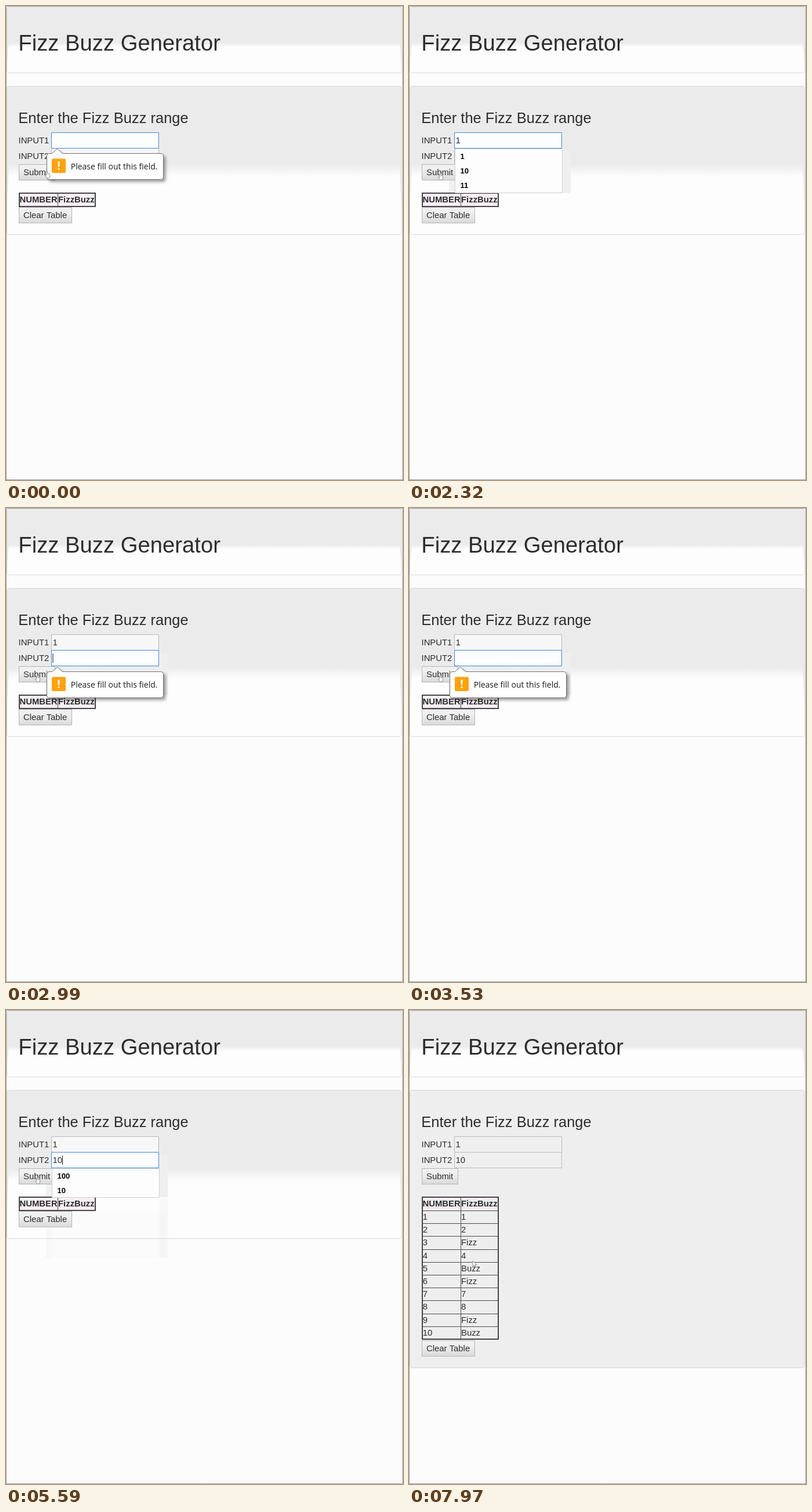
Write an HTML page with a canvas that moves like this. It is 685 by 818 pixels and loops after 8000 ms.

```html
<!DOCTYPE html>
<html lang="en">
<head>
<meta charset="utf-8">
<title>Fizz Buzz Generator</title>
<style>
html, body { margin: 0; width: 100%; height: 100%; overflow: hidden; background: #fcfcfc; }
canvas { display: block; }
</style>
</head>
<body>
<canvas id="stage" width="685" height="818"></canvas>
<script>
const ctx = document.getElementById('stage').getContext('2d');
const LOOP = 8000, TABLE_AT = 6660;
const SANS = '"Liberation Sans", Arial, sans-serif';
const INK = '#2d2d2d';
const hand = new Path2D('M3 8V1.5Q4 .3 5 1.5V5L8.5 6V10L7.5 13H3.5L.5 8Z');
const arrow = new Path2D('M0 0V9L2.5 7L4 10L5.5 9.5L4 6.5H7Z');

// Each track lists [time, value...]; a value holds until the next entry.
const caretTrack = [[0, 0], [120, 1], [670, 0], [1230, 1], [2180, 0], [2720, 1], [3140, 0],
  [3680, 1], [4200, 0], [4730, 1], [6120, 0]];
const focusTrack = [[0, 1], [2600, 0], [2720, 2], [6530, 0]];
const bubbleTrack = [[0, 1], [1630, .45], [1760, 0], [2720, .27], [2870, .7], [2990, 1], [5320, .45], [5450, 0]];
const menuTrack = [[0], [1760, '1', '10', '11'], [2600],
  [5450, '100', '10', '1', '15', '11', '12'], [5590, '100', '10'], [6530]];
const pointerTrack = [[0, hand, 67, 284], [1900, hand, 60, 287], [2020, hand, 52, 289], [2180, hand, 50, 288],
  [2320, hand, 50, 287], [7430, arrow, 72, 302], [7550, arrow, 91, 323], [7700, arrow, 100, 349],
  [7820, arrow, 107, 374], [7970, arrow, 110, 433]];

const at = (track, t) => track.filter(step => step[0] <= t).pop().slice(1);

function text(str, x, y, size = 14.875, color = INK, weight = '', family = SANS) {
  ctx.font = `${weight} ${size}px ${family}`;
  ctx.fillStyle = color;
  ctx.fillText(str, x, y);
}

function box(x, y, w, h, fill, stroke, r = 0) {
  ctx.beginPath();
  ctx.roundRect(x + .5, y + .5, w - 1, h - 1, r);
  ctx.fillStyle = fill;
  ctx.fill();
  ctx.strokeStyle = stroke;
  ctx.lineWidth = 1;
  ctx.stroke();
}

function rect(x, y, w, h, fill) {
  ctx.fillStyle = fill;
  ctx.fillRect(x, y, w, h);
}

function vertical(y0, y1, top, bottom) {
  const g = ctx.createLinearGradient(0, y0, 0, y1);
  g.addColorStop(0, top);
  g.addColorStop(1, bottom);
  return g;
}

// Gray upper half that melts into white, with thin tapering edges below.
function glassPanel(y, h, fadeFrom, fadeTo) {
  box(1, y, 682, h, vertical(fadeFrom, fadeTo, '#ebebeb', '#fdfdfd'), '#dadada', 4);
  const tip = fadeTo + (fadeTo - fadeFrom) * 1.5 + 14;
  ctx.fillStyle = '#ececec';
  for (const [edge, side] of [[2, 1], [682, -1]]) {
    ctx.beginPath();
    ctx.moveTo(edge, fadeFrom);
    ctx.lineTo(edge + 3 * side, fadeFrom);
    ctx.lineTo(edge + 2 * side, fadeTo);
    ctx.lineTo(edge, tip);
    ctx.fill();
  }
}

function button(label, y, w, flat) {
  box(22, y, w, 28, flat ? '#f1f1f1' : vertical(y + 8, y + 27, '#f0f0f0', '#dbdbdb'), flat ? '#a0a0a0' : '#b4b4b4');
  text(label, 30, y + 19);
}

function input(y, value, focused, caret, idle) {
  box(78, y, 186, 28, focused ? '#fbfdff' : idle, focused ? '#4289e0' : '#b9b9b9');
  text(value, 80.5, y + 18.5);
  if (focused && caret) rect(80.5 + value.length * 8.27, y + 6, 1, 16, '#222');
}

function table(rows) {
  const bottom = 346 + rows * 22.2;
  rect(23, 323, 131, 23, rows ? '#f1ecf0' : '#f6f0f5');
  text('NUMBER', 23.5, 339, 14.875, INK, 'bold');
  text('FizzBuzz', 90, 339, 14.875, INK, 'bold');
  for (let n = 1; n <= rows; n++) {
    const y = 346 + (n - 1) * 22.2;
    const word = (n % 3 ? '' : 'Fizz') + (n % 5 ? '' : 'Buzz') || n;
    rect(23, Math.round(y), 131, 1, '#4a4a4a');
    text(n, 23.7, y + 16);
    text(word, 90, y + 16);
  }
  rect(89, 323, 1, bottom - 323, '#4a4a4a');
  ctx.strokeStyle = '#484448';
  ctx.lineWidth = 2;
  ctx.strokeRect(23, 323, 131, Math.round(bottom) - 323);
}

function menu(y, items) {
  const h = Math.round(items.length * 25.6);
  box(79, y, 186, h, '#fdfdfd', '#cfcfcf');
  items.forEach((item, i) => text(item, 88.5, y + 17.5 + i * 25.4, 13, '#000', 'bold'));
}

function bubble(y, alpha) {
  const grow = .952 + .048 * alpha;
  ctx.save();
  ctx.globalAlpha = alpha;
  ctx.translate(98, y + 26);
  ctx.scale(grow, grow);
  ctx.translate(-98, -26);
  ctx.beginPath();
  ctx.moveTo(74.5, 8.5);
  ctx.lineTo(79.5, 8.5);
  ctx.lineTo(88.5, .5);
  ctx.lineTo(97.5, 8.5);
  ctx.lineTo(267, 8.5);
  ctx.arcTo(271.5, 8.5, 271.5, 13, 4);
  ctx.arcTo(271.5, 53.5, 267, 53.5, 4);
  ctx.arcTo(70.5, 53.5, 70.5, 49, 4);
  ctx.arcTo(70.5, 8.5, 74.5, 8.5, 4);
  ctx.closePath();
  ctx.shadowColor = 'rgba(0,0,0,.38)';
  ctx.shadowBlur = 5;
  ctx.shadowOffsetX = ctx.shadowOffsetY = 4;
  ctx.fillStyle = '#fff';
  ctx.fill();
  ctx.shadowColor = 'transparent';
  ctx.strokeStyle = '#707070';
  ctx.lineWidth = 1;
  ctx.stroke();
  ctx.beginPath();
  ctx.roundRect(79, 17.5, 24, 24.5, 2);
  ctx.fillStyle = '#ffa20c';
  ctx.fill();
  ctx.beginPath();
  ctx.moveTo(89.2, 22.5);
  ctx.lineTo(92.8, 22.5);
  ctx.lineTo(92, 32);
  ctx.lineTo(90, 32);
  ctx.fillStyle = '#fff';
  ctx.fill();
  rect(89.7, 34, 2.7, 2.7, '#fff');
  text('Please fill out this field.', 111.7, 36.3, 14, '#1c1c1c', '', '"Open Sans", "Noto Sans", sans-serif');
  ctx.restore();
}

function pointer(shape, x, y) {
  ctx.save();
  ctx.translate(x, y);
  ctx.fillStyle = '#fafafa';
  ctx.strokeStyle = '#8a8a8a';
  ctx.lineWidth = .9;
  ctx.fill(shape);
  ctx.stroke(shape);
  ctx.restore();
}

function draw(t) {
  const done = t >= TABLE_AT;
  const [focus] = at(focusTrack, t), [caret] = at(caretTrack, t), [alpha] = at(bubbleTrack, t);
  const items = at(menuTrack, t);
  const first = t < 1630 ? '' : '1';
  const second = t < 5320 ? '' : t < 5590 ? '1' : '10';
  const idle = done ? '#efefef' : '#f7f7f7';
  const lower = t >= 2600;

  box(0, 0, 685, 818, '#fcfcfc', '#9c9c9c');
  glassPanel(1, 115, 63, 71);
  if (done) box(1, 138, 682, 480, '#eeeeee', '#d6d6d6', 4);
  else glassPanel(138, 257, 274, 294);

  // Faint halo left behind by the popups
  if (t >= 1760 && !done) {
    rect(265, 250, 14, 73, '#efefef');
    rect(69, 301, 10, 21, '#f0f0f0');
  }
  if (t >= 5450 && !done) {
    rect(69, 347, 210, 81, 'rgba(0,0,0,.008)');
    rect(69, 347, 10, 81, 'rgba(0,0,0,.012)');
    rect(265, 325, 14, 103, 'rgba(0,0,0,.02)');
  }

  text('Fizz Buzz Generator', 21.3, 77, 38.25);
  text('Enter the Fizz Buzz range', 21.3, 202, 25.5);
  text('INPUT1', 21.5, 236.5);
  text('INPUT2', 21.5, 264);
  input(245, second, focus === 2, caret, idle);
  input(218, first, focus === 1, caret, idle);
  if (focus === 2) input(245, second, true, caret, idle);
  button('Submit', 273, 63, t >= 6530 && t < 7430);
  table(done ? 10 : 0);
  button('Clear Table', done ? 570 : 347, 92, false);

  if (items.length) menu(lower ? 273 : 246, items);
  if (alpha) bubble(lower ? 274 : 246, alpha);
  pointer(...at(pointerTrack, t));
}

function frame(now) {
  draw(now % LOOP);
  requestAnimationFrame(frame);
}
requestAnimationFrame(frame);
</script>
</body>
</html>
```
